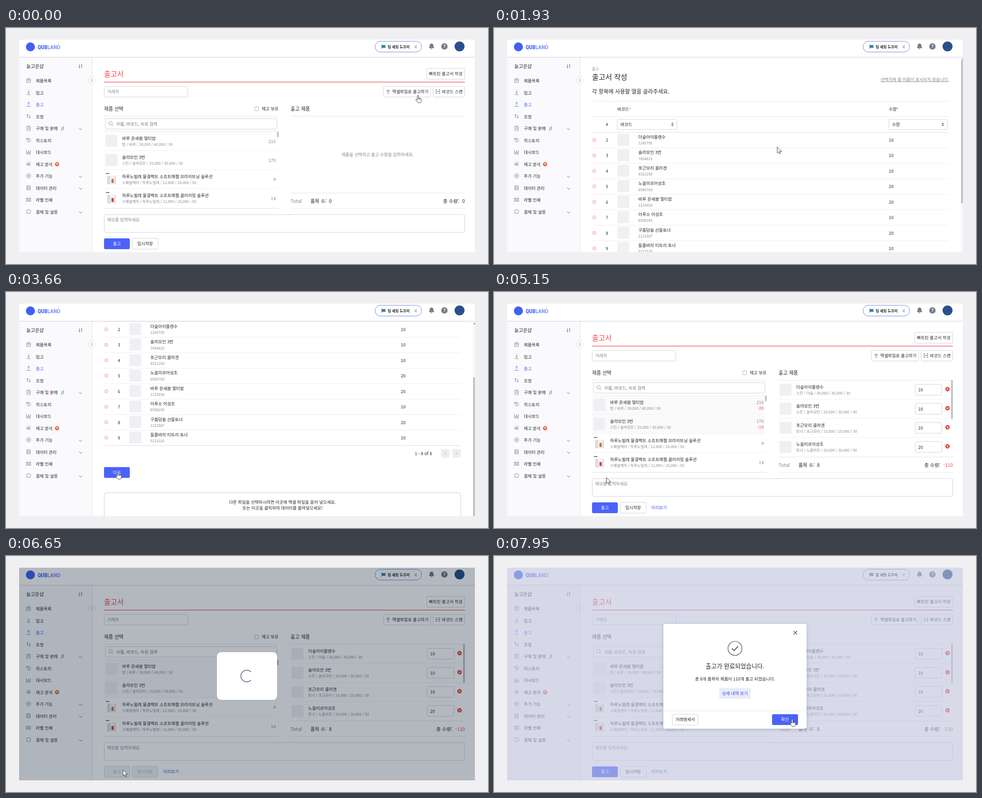
Recreate the animation shown at these times as an HTML page. Size 1067x525 px, loop 8000 ms.

```html
<!DOCTYPE html>
<html lang="ko">
<head>
<meta charset="utf-8">
<title>출고서</title>
<style>
  html, body { margin: 0; width: 100%; height: 100%; overflow: hidden; background: #f0f0f2; }
  svg { display: block; }
  text { font-family: 'Noto Sans CJK KR', 'Noto Sans CJK', 'Noto Sans', sans-serif; white-space: pre; }
  .brand { font-family: 'Roboto Condensed', 'Open Sans', Roboto, sans-serif; font-stretch: 75%; }
</style>
</head>
<body>
<svg id="stage" width="1067" height="525" viewBox="0 0 1067 525"></svg>
<script>
const INK = '#24252b', GRAY = '#85868f', LINE = '#e6e6eb', BORDER = '#d0d1d9', BLUE = '#4b62fa', RED = '#f3474c';
const LOOP = 8000, SCROLL = 166, PITCH = 42.4, ROW = 34.45;

// y is the visual middle of the line of text
const text = (x, y, s, { size = 9.4, fill = INK, weight = 400, anchor = 'start', extra = '' } = {}) =>
  `<text x="${x}" y="${y + size * .37}" font-size="${size}" fill="${fill}" font-weight="${weight}" text-anchor="${anchor}" ${extra}>${s}</text>`;
const rect = (x, y, w, h, fill, { stroke = 'none', rx = 0, extra = '' } = {}) =>
  `<rect x="${x}" y="${y}" width="${w}" height="${h}" rx="${rx}" fill="${fill}" stroke="${stroke}" ${extra}/>`;
const path = (d, stroke = '#777984', width = 1, fill = 'none', x = 0, y = 0) =>
  `<path d="${d}" transform="translate(${x} ${y})" stroke="${stroke}" stroke-width="${width}" fill="${fill}" stroke-linecap="round" stroke-linejoin="round"/>`;
const circle = (x, y, r, fill, stroke = 'none', width = 1) =>
  `<circle cx="${x}" cy="${y}" r="${r}" fill="${fill}" stroke="${stroke}" stroke-width="${width}"/>`;
const hline = (x1, x2, y, color = LINE, width = 1) => rect(x1, y - width / 2, x2 - x1, width, color);
const group = (id, body, extra = '') => `<g id="${id}" ${extra}>${body}</g>`;
const field = (x, y, w, h) => rect(x, y, w, h, '#fff', { stroke: BORDER, rx: 3 });
const thumb = (x, y) => rect(x, y, 26.5, 27, '#f0f0f4', { rx: 2 });
const button = (x, y, w, label, fill = '#fff') => {
  const plain = fill === '#fff';
  return rect(x, y, w, 24, fill, { stroke: plain ? BORDER : 'none', rx: 3 }) +
    text(x + w / 2, y + 12, label, { fill: plain ? INK : '#fff', anchor: 'middle', weight: 500 });
};
const cross = (x, y, r, color, width = 1) => path(`M${-r} ${-r}L${r} ${r}M${r} ${-r}L${-r} ${r}`, color, width, 'none', x, y);
const repeat = (n, fn) => Array.from({ length: n }, (_, i) => fn(i)).join('');

const products = [
  ['더숲아이몰렌수', 1245795, 10], ['솔라모인 3번', 7854625, 10], ['포근모리 콜라겐', 4521258, 10],
  ['노을미르어성초', 6985789, 20], ['바루 온새봄 멀티밤', 2123654, 20], ['이루소 어성초', 8598245, 10],
  ['구름담솔 산들토너', 2122587, 20], ['들풀바라 티트리 토너', 5212326, 10]
];
const details = ['스킨 / 더숲 / 30,000 / 45,000 / 30', '스킨 / 솔라모인 / 25,000 / 30,000 / 50',
  '토너 / 포근모리 / 15,000 / 25,000 / 30', '토너 / 노을미르 / 20,000 / 30,000 / 50'];
const stock = [
  ['바루 온새봄 멀티밤', '밤 / 바루 / 30,000 / 40,000 / 50', 210, -20],
  ['솔라모인 3번', '스킨 / 솔라모인 / 25,000 / 30,000 / 50', 170, -10],
  ['하루노빌레 물결팩트 소프트메젤 브라이트닝 솔루션', '스페셜케어 / 하루노빌레 / 12,000 / 20,000 / 50', 4, 0, '#c9703f'],
  ['하루노빌레 물결팩트 소프트메젤 클리어링 솔루션', '스페셜케어 / 하루노빌레 / 12,000 / 20,000 / 50', 14, 0, '#cf4a3c']
];

const menu = [
  ['제품목록', 'M-4-2h8v6h-8zM-4-2l1-2.5h6l1 2.5M-1.5 .5h3'],
  ['입고', 'M0-5v7M-2.5-.5L0 2l2.5-2.5M-4 4.5h8'],
  ['출고', 'M0 2v-7M-2.5-2.5L0-5l2.5 2.5M-4 4.5h8'],
  ['조정', 'M-2.5 3v-7M-4.5-2l2-2 2 2M2.5-3v7M.5 2l2 2 2-2'],
  ['구매 및 판매', 'M-3.5-4.5h7v9h-7zM-1.5-2h3M-1.5 .5h3', true],
  ['히스토리', 'M-4.5-4.5v3h3M-4.2-1.5a4.3 4.3 0 1 1 1 4.5M0-2v2.5l2 1'],
  ['대시보드', 'M-4.5-4.5v9h9M-2 2.5v-3M0 2.5v-5M2 2.5v-3M4 2.5v-6'],
  ['재고 분석', 'M-4.5 1q4.5-5 9 0q-4.5 5-9 0M-1 1a1 1 0 1 0 2 0a1 1 0 1 0-2 0M0-3v-1.5M-3-2l-1-1.5M3-2l1-1.5'],
  ['추가 기능', 'M-4.6 0a4.6 4.6 0 1 0 9.2 0a4.6 4.6 0 1 0-9.2 0M-2 0h4M0-2v4', true],
  ['데이터 관리', 'M-3.5-4.5h7v9h-7zM-3.5-1.5h7M-3.5 1.5h7', true],
  ['라벨 인쇄', 'M-4.5-3.5h9v7h-9zM-2.5-1.5v3M-.7-1.5v3M1-1.5h1.8M1 1.5h1.8'],
  ['결제 및 설정', 'M-2-3.5L0-4.8 2-3.5 4-3.2 4-1 4.7 0 4 1.5 4 3.2 2 3.5 0 4.8-2 3.5-4 3.2-4 1-4.7 0-4-1.5-4-3.2z', true]
];

const frame = rect(29, 26, 1009, 472.5, '#fff') + rect(29, 65, 161, 433.5, '#fafafc') +
  rect(190, 65, 1, 433.5, '#e2e2e8') + hline(29, 1038, 65, '#d4d5dc', 1.2) +
  circle(54, 42, 10, '#4161f5') +
  text(70, 42, '<tspan font-weight="700">QUB</tspan>LANO', { size: 12.5, fill: '#4161f5', extra: 'class="brand"' }) +
  rect(817, 29.5, 103, 24, '#fff', { stroke: '#7485dc', rx: 12 }) +
  path('M0 0h9l-2 3 2 3h-9z', 'none', 0, '#2a84a8', 832, 38) + path('M0 0v9', '#3f5d80', 1, 'none', 832, 37) +
  text(845, 42, '팀 세팅 도우미', { size: 8, weight: 700 }) + cross(907, 42, 2.8, '#666873', .9) +
  path('M-5 3q1.5-1.5 1.5-5a3.5 3.5 0 0 1 7 0q0 3.5 1.5 5zM-1 5.5h2M0-6v1', '#777985', 1.3, '#777985', 942, 41) +
  circle(970.5, 41, 7, '#777985') + text(970.5, 41, '?', { size: 10, fill: '#fff', weight: 700, anchor: 'middle' }) +
  circle(1004, 41, 11, '#28508c') +
  text(45, 85, '늘고운샵', { size: 10.5, weight: 500 }) +
  path('M-2.2-4v8M-4.2 2l2 2M2.2 4v-8M4.2-2l-2-2', '#666873', 1, 'none', 165, 85) +
  menu.map(([label, icon, opens], i) => {
    const y = 118 + i * 26.5, active = i === 2;
    return path(icon, active ? BLUE : '#777984', .9, 'none', 50, y - 1) +
      text(66, y, label, { fill: active ? BLUE : INK }) +
      (opens ? path('M-3-1.5L0 1.5 3-1.5', '#666873', 1, 'none', 165, y + 1) : '');
  }).join('') +
  text(121.5, 223.5, 'β', { size: 10, fill: '#2d8a8c', extra: 'font-style="italic"' }) +
  circle(113, 303, 4.7, '#ee5a32') + text(113, 303, 'N', { size: 6, fill: '#fff', weight: 700, anchor: 'middle' });

const collapse = circle(190, 116, 7.5, '#fff', '#dcdce3') + path('M1.5-3L-1.5 0 1.5 3', '#555762', 1, 'none', 190, 116);

const photo = (y, tint) => rect(221, y, 8, 1.6, '#55565c') + rect(224, y + 6, 19, 19, '#dcdce0') +
  rect(231, y + 5, 9, 20, '#f6f4f3', { rx: 2 }) + rect(233.5, y + 13, 5, 9, tint, { rx: 1 });

const stockRow = ([name, sub, count, delta, tint], i) => {
  const y = 245.5 + i * PITCH;
  const qty = (at, s, fill) => text(597, at, s, { size: 9.6, fill, weight: 500, anchor: 'end' });
  return (delta ? rect(217, y - 15, 383, PITCH, '#fafafb', { extra: 'class="filled"' }) : '') +
    (tint ? photo(y - 7.5, tint) : thumb(220, y - 8)) +
    text(257, y, name) + text(257, y + 13.3, sub, { size: 8.15, fill: GRAY }) +
    (delta ? `<g class="empty">${qty(y + 6.5, count, GRAY)}</g><g class="filled">${qty(y, count, GRAY) + qty(y + 13, delta, RED)}</g>`
      : qty(y + 6.5, count, GRAY)) +
    (i < 3 ? hline(217, 600, y + 27.3, '#f0f0f3') : '');
};

const pickedRow = i => {
  const y = 211.5 + i * PITCH;
  return thumb(632, y - 7.5) + text(669, y, products[i][0]) + text(669, y + 13.4, details[i], { size: 8.15, fill: GRAY }) +
    field(932.5, y - 6, 59, 24) + text(939, y + 6.5, products[i][2]) +
    circle(1004, y + 4.6, 4.8, '#e2382f') + cross(1004, y + 4.6, 1.7, '#fff', 1.1) +
    (i < 3 ? hline(630, 1010, y + 27.3, '#f0f0f3') : '');
};

const total = (n, sum, fill) => text(715, 385, n, { size: 10.7 }) +
  text(1016, 385, sum, { size: 10.7, fill, anchor: 'end' }) +
  text(sum ? 988 : 1003, 385, '총 수량:', { size: 10.7, anchor: 'end' });

const slip = text(217, 102.5, '출고서', { size: 15.8, fill: RED }) + hline(217, 1016, 120.3, '#ee5055', 1.3) +
  button(931.5, 90, 84, '빠트린 출고서 작성') +
  field(217.5, 130, 185, 23.5) + text(224, 142, '거래처', { fill: GRAY }) +
  field(835.5, 130, 104.5, 23.5) + path('M0 4.5v-9M-3.8-.7L0-4.5 3.8-.7', '#555762', 1, 'none', 846, 142) + text(855, 142, '엑셀파일로 출고하기') +
  field(945.5, 130, 70, 23.5) + path('M-4-2v-2h2M2-4h2v2M4 2v2h-2M-2 4h-2v-2M-4 0h8', '#555762', 1, 'none', 956, 141.5) + text(965, 142, '바코드 스캔') +
  text(217, 180, '제품 선택', { size: 10.8, weight: 500 }) + rect(550.5, 175.5, 8.5, 8.5, '#fff', { stroke: '#a9aab4', rx: 1.5 }) +
  text(566, 180, '재고 보유', { weight: 500 }) + text(630, 180, '출고 제품', { size: 10.8, weight: 500 }) +
  hline(217, 603, 196.3) + hline(630, 1016, 196.3) +
  field(220, 201.5, 380, 23.5) + circle(231.5, 212, 3.8, 'none', '#9b9ca6') + path('M0 0l2.6 2.6', '#9b9ca6', 1, 'none', 234.3, 214.8) +
  text(244, 213.3, '이름, 바코드, 속성 검색', { fill: '#6f707a' }) + hline(217, 603, 230.5) +
  stock.map(stockRow).join('') +
  rect(600, 231, 3.5, 12, '#bcbdc4', { rx: 1 }) + hline(217, 603, 401.3, '#dedee4') +
  hline(630, 1016, 367) + hline(630, 1016, 401.3) +
  text(630, 385, 'Total', { size: 10.7, fill: GRAY }) + text(674, 385, '품목 수:', { size: 10.7 }) +
  `<g class="empty">${text(822.5, 282, '제품을 선택하고 출고 수량을 입력하세요.', { fill: GRAY, anchor: 'middle' })}${total(0, 0, INK)}</g>` +
  `<g class="filled">${repeat(4, pickedRow)}${rect(1012, 196, 3.6, 87, '#bcbdc4', { rx: 1 })}${total(8, -110, RED)}${text(348, 480, '미리보기', { fill: '#4058e8', weight: 500 })}</g>` +
  field(217.5, 415, 798, 39.5) + text(224, 427, '메모를 입력하세요.', { fill: GRAY }) +
  group('buttons', button(217, 468, 57, '출고', BLUE) + button(279.5, 468, 57, '임시저장')) +
  group('pressed', rect(216, 467, 59, 26, '#c9d0fa', { rx: 4 }) + button(217, 468, 57, '출고', '#4357c6')) +
  group('disabled', ['출고', '임시저장'].map((label, i) =>
    rect(217.5 + i * 62, 468, 56, 24, '#f3f3f5', { stroke: BORDER, rx: 3 }) +
    text(245.5 + i * 62, 480, label, { fill: '#b3b4bc', anchor: 'middle' })).join(''));

const heading = text(217, 91, '출고', { size: 8, fill: GRAY }) + text(217, 109.5, '출고서 작성', { size: 16, weight: 500 });
const dashed = (y, w, h) => rect(217.5, y, w, h, '#fff', { stroke: '#c5c6cc', rx: 5, extra: 'stroke-width="1.3" stroke-dasharray="4 2"' });

const upload = heading + text(217, 142, '엑셀 가져오기 안내', { size: 12, weight: 500 }) +
  rect(923, 96, 93, 25, BLUE, { rx: 3 }) + path('M0-4v8.5M-3.5 1L0 4.5 3.5 1', '#fff', 1.2, 'none', 939, 108.5) +
  text(948, 108.3, '엑셀 양식 저장', { fill: '#fff', weight: 500 }) + hline(217, 1016, 163) +
  text(217, 183.5, '• 제품의 바코드와 수량이 포함된 엑셀 파일을 불러옵니다.') +
  text(217, 197, '• 엑셀의 첫번째 행은 각 열의 이름으로 인식합니다.') + dashed(223, 798, 102.5) +
  path('M-6 9h-2.5a5.6 5.6 0 0 1-1-11.2a8.2 8.2 0 0 1 15.5-5a6 6 0 0 1 5.2 5.6a5.4 5.4 0 0 1-2.7 10.6h-2.5', '#c3c4ca', 2, 'none', 616, 260) +
  path('M0 12v-13M-4.5 2.5L0-2 4.5 2.5', '#4ba3fb', 3, 'none', 616, 260) +
  text(616, 297, '이곳에 파일을 끌어 넣거나 가져올 파일을 선택해주세요.', { size: 10.75, anchor: 'middle' }) +
  rect(217, 339, 799, 26.5, '#f0f0f4', { rx: 3 }) +
  text(616.5, 352.3, '또는 이곳을 클릭하여 데이터를 붙여넣으세요!', { anchor: 'middle' });

const select = (x, w, label) => field(x, 203, w, 23) + text(x + 7, 214.8, label) +
  path('M-2.2-1.2L0-4 2.2-1.2zM-2.2 1.2L0 4 2.2 1.2z', '#777984', .5, '#777984', x + w - 10, 214.5);
const required = s => `${s}<tspan fill="${RED}">*</tspan>`;

const mappingRow = i => {
  const y = 249.5 + i * ROW, [name, code, qty] = products[i];
  return circle(222, y - .5, 4.5, '#f7cdcb') + cross(222, y - .5, 1.5, '#fff', 1.1) +
    text(250, y, i + 2, { anchor: 'middle' }) + thumb(273, y - 14.5) +
    text(319.5, y - 7, name) + text(319.5, y + 6.7, code, { size: 8, fill: GRAY }) + text(874, y, qty) +
    hline(217, 1007, y + 17, i < 7 ? '#ededf1' : '#d9dae0');
};

const mapping = heading + text(217, 142, '각 항목에 사용할 열을 골라주세요.', { size: 12, weight: 500 }) +
  text(1007, 114.5, '선택지에 열 이름이 표시되지 않습니다.', { fill: GRAY, anchor: 'end', extra: 'text-decoration="underline"' }) +
  hline(217, 1007, 163) + text(273, 181, required('바코드'), { weight: 500 }) + text(874, 181, required('수량'), { weight: 500 }) +
  hline(217, 1007, 197.3) + text(250, 215, '#', { anchor: 'middle' }) +
  select(273, 132, '바코드') + select(874, 129.5, '수량') + hline(217, 1007, 232, '#dedee4') + repeat(8, mappingRow) +
  text(943, 525.3, '1 - 8 of 8', { anchor: 'end' }) +
  rect(963, 515.5, 19, 19, '#eeeef1', { rx: 3 }) + rect(988, 515.5, 19, 19, '#eeeef1', { rx: 3 }) +
  path('M1.5-3L-1.5 0 1.5 3M23.5-3L26.5 0 23.5 3', '#a0a1aa', 1, 'none', 972.5, 525) +
  button(217, 555.5, 57, '다음', BLUE) + dashed(612.5, 789, 62) +
  text(612, 634, '다른 파일을 선택하시려면 이곳에 엑셀 파일을 끌어 넣으세요.', { anchor: 'middle' }) +
  text(612, 647, '또는 이곳을 클릭하여 데이터를 붙여넣으세요!', { anchor: 'middle' });

const loading = rect(467, 214, 133, 106, '#fff', { rx: 9 }) +
  group('spinner', path('M8.5-9.8A13 13 0 1 0 8.5 9.8', '#75839b', 2));

const done = rect(375, 151, 317, 233, '#fff', { rx: 4, extra: 'filter="url(#shadow)"' }) + cross(667, 170.5, 3.7, '#333', 1.1) +
  circle(533.5, 205.5, 15.5, '#fff', '#3d4a4c', 1.2) + path('M-6 .5L-1.5 5 7-4.5', '#222', 1.5, 'none', 533, 205.5) +
  text(533.5, 245, '출고가 완료되었습니다.', { size: 13.3, anchor: 'middle' }) +
  text(533.5, 274, '총 8개 품목의 제품이 110개 출고 되었습니다.', { anchor: 'middle' }) +
  rect(498.5, 293.5, 70, 24, '#e9ecfa', { rx: 3 }) +
  text(533.5, 305.7, '상세 내역 보기', { fill: '#3a50d8', weight: 500, anchor: 'middle' }) +
  hline(375, 692, 344.3) + button(394.5, 352, 57, '거래명세서') + button(615.5, 352, 57.5, '확인', BLUE);

const stage = document.getElementById('stage');
stage.innerHTML = `<defs><clipPath id="pane"><rect x="191" y="66" width="847" height="432.5"/></clipPath>
  <filter id="shadow" x="-10%" y="-10%" width="120%" height="120%"><feDropShadow dx="0" dy="2" stdDeviation="4" flood-color="#334" flood-opacity=".18"/></filter></defs>` +
  frame + group('slip', slip) + group('upload', upload) +
  group('mapping', group('sheet', mapping) + rect(1033.5, 66, 4.5, 440, '#f8f8f9') +
    path('M-1.5 1L0-1 1.5 1z', '#666', .5, '#666', 1037, 70) + rect(1034, 73, 4, 317, '#c0c0c3', { extra: 'id="bar"' }), 'clip-path="url(#pane)"') +
  collapse +
  rect(29, 26, 1009, 473, '#001428', { extra: 'id="dim"' }) + rect(29, 26, 1009, 473, '#bec2dc', { extra: 'id="veil"' }) +
  group('loading', loading) + group('done', done) +
  group('cursor', group('click', circle(0, 2.5, 10, '#d6d03a'), 'opacity=".65"') +
    group('arrow', path('M0 0V13l3-2.6 2.1 4.6 2.1-1-2-4.4h4.2z', '#2b2b30', .9, '#fff')) +
    group('hand', path('M-1.4 9V1.3a1.4 1.4 0 0 1 2.8 0V6l4.6 1.2q1.8 .5 1.6 2.3l-.7 4.3q-.4 2.6-2.5 2.6H1.2q-1.5 0-2.3-1.5l-3.8-5q.8-2 3.5-.9zM1.5 6v3M4 6.8v2.4', '#2b2b30', .9, '#fff')));

const el = id => document.getElementById(id);
const show = (node, on) => node.setAttribute('display', on ? 'inline' : 'none');
const ramp = (t, from, to) => Math.max(0, Math.min(1, (t - from) / (to - from)));
const within = (t, ...spans) => spans.some(([from, to]) => t >= from && t < to);

// start, end, then start, control and end points of a curve
const moves = [
  [340, 410, 912, 150, 910, 150, 907, 150],
  [880, 1680, 907, 150, 840, 110, 627, 265],
  [3070, 3660, 627, 265, 440, 300, 248, 400],
  [5090, 5500, 248, 400, 250, 440, 256, 474],
  [6370, 6440, 256, 474, 258, 475, 259, 476],
  [7060, 7680, 259, 476, 460, 370, 652, 369],
  [7820, 7950, 652, 369, 656, 368, 660, 363]
];

function cursorAt(t) {
  const [from, to, x0, y0, x1, y1, x2, y2] = moves.filter(m => t >= m[0]).pop() || moves[0];
  const p = ramp(t, from, to), u = p + p * p - p * p * p, v = 1 - u;
  return [v * v * x0 + 2 * u * v * x1 + u * u * x2, v * v * y0 + 2 * u * v * y1 + u * u * y2];
}

function render(t) {
  const filled = t >= 4070;
  show(el('slip'), t < 340 || filled);
  show(el('upload'), within(t, [340, 1870]));
  show(el('mapping'), within(t, [1870, 4070]));
  stage.querySelectorAll('.filled').forEach(n => show(n, filled));
  stage.querySelectorAll('.empty').forEach(n => show(n, !filled));

  const scrolled = 1 - (1 - ramp(t, 2340, 2600)) ** 2;
  el('sheet').setAttribute('transform', `translate(0 ${-SCROLL * scrolled})`);
  el('bar').setAttribute('y', 73 + 117 * scrolled);

  show(el('pressed'), within(t, [5970, 6370]));
  show(el('disabled'), within(t, [6370, 6850]));
  show(el('buttons'), !within(t, [6370, 6850]));

  const finish = ramp(t, 6850, 7050);
  el('dim').setAttribute('opacity', .3 * ramp(t, 6370, 6570) * (1 - finish));
  el('veil').setAttribute('opacity', .6 * finish);
  show(el('loading'), within(t, [6440, 6850]));
  el('spinner').setAttribute('transform', `translate(533 267) rotate(${(t - 6650) * .36})`);
  el('done').setAttribute('opacity', finish);

  const hand = within(t, [0, 340], [1440, 1870], [3560, 4070], [5400, 6370], [7600, LOOP]);
  show(el('hand'), hand);
  show(el('arrow'), !hand);
  show(el('click'), within(t, [70, 140], [3930, 4000], [5970, 6370]));
  el('cursor').setAttribute('transform', `translate(${cursorAt(t)})`);
}

const start = performance.now();
function tick() {
  render((performance.now() - start) % LOOP);
  requestAnimationFrame(tick);
}
tick();
</script>
</body>
</html>
```
